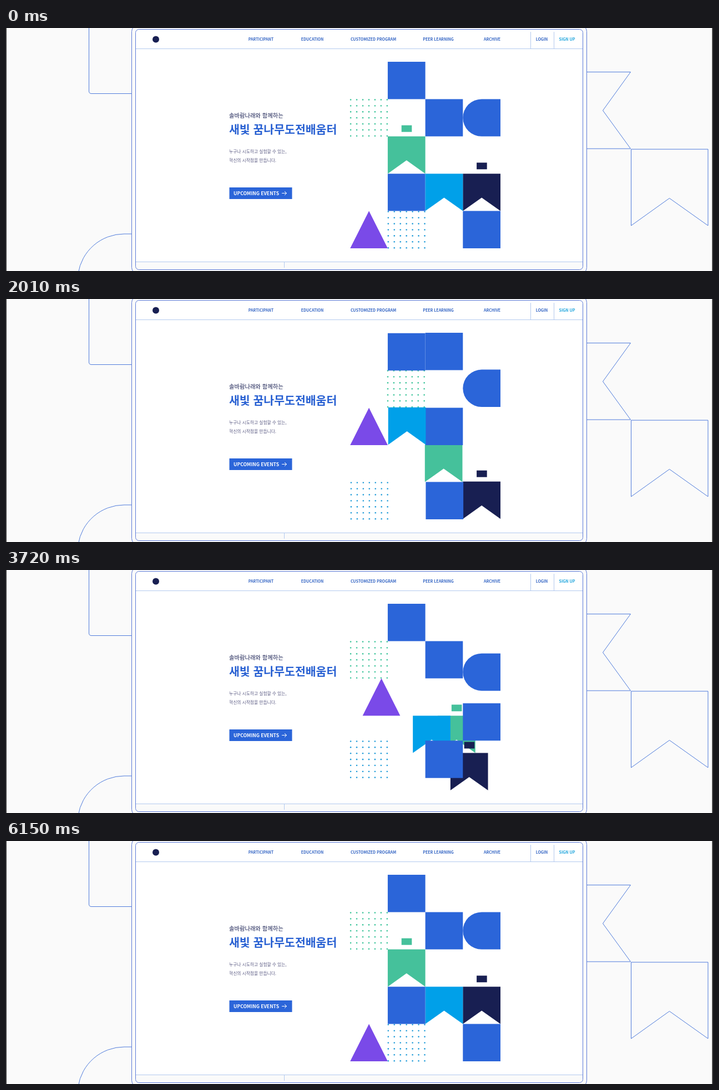
Recreate the animation shown at these times as an HTML page. Size 1274 by 439 pixels, loop 6180 ms.

```html
<!DOCTYPE html>
<html lang="ko">
<head>
<meta charset="utf-8">
<title>Moving blocks</title>
<style>
html, body { margin: 0; width: 100%; height: 100%; overflow: hidden; background: #fafafa; }
svg { display: block; font-family: "Noto Sans CJK KR", "Noto Sans CJK JP", "Noto Sans", sans-serif; }
.line { fill: none; stroke: #4f7bdb; }
.pale { fill: none; stroke: #b3c9ee; }
.nav { font-size: 7px; font-weight: 700; fill: #3465c4; text-anchor: middle; }
.body { font-size: 7.75px; fill: #5c5c84; }
</style>
</head>
<body>
<svg width="1274" height="439" viewBox="0 0 1274 439">
  <rect width="1274" height="439" fill="#fafafa"/>
  <path fill="#333" d="M0 0h1v439h-1z"/>
  <path fill="#1c1c1c" d="M1272.5 0h1.5v439h-1.5z"/>

  <!-- background outlines -->
  <g class="line">
    <path d="M149.5 0V114q0 4.5 4.5 4.5H226"/>
    <path d="M130 444A84 84 0 0 1 213 372H226"/>
    <path d="M1046 79.5H1125.5L1075.5 149 1125.5 218H1046"/>
    <path d="M1126.5 219H1265V357L1195.5 307.5 1126.5 357Z"/>
  </g>

  <!-- window -->
  <rect x="226.5" y="-5.5" width="820" height="450" rx="12" fill="#fafafa" stroke="#5d7bd8"/>
  <rect x="233.5" y="2.5" width="806" height="434" rx="6" fill="#fff"/>
  <path d="M234 422H1039V430q0 6-6 6H240q-6 0-6-6Z" fill="#fafafa"/>
  <path class="pale" d="M234 37.5H1039M945.5 7V37M987.5 7V37M234 422.5H1039M501.5 422V433"/>
  <rect x="233.5" y="2.5" width="806" height="434" rx="6" fill="none" stroke="#5d7bd8"/>
  <circle cx="270" cy="20.5" r="6" fill="#181f52"/>
  <g id="nav"></g>

  <!-- copy -->
  <text x="402" y="162" font-size="10.3" font-weight="500" fill="#181f52">솔바람나래와 함께하는</text>
  <text x="402" y="191" font-size="20.5" font-weight="700" fill="#2860d2">새빛 꿈나무도전배움터</text>
  <text class="body" x="402" y="226">누구나 시도하고 실험할 수 있는,</text>
  <text class="body" x="402" y="241.5">혁신의 시작점을 만듭니다.</text>
  <rect x="402.5" y="288" width="113" height="21" fill="#2b65d9"/>
  <text x="410" y="301.8" font-size="8.6" font-weight="700" fill="#fff">UPCOMING EVENTS</text>
  <path d="M497 298.5h8.5M502 295l3.5 3.5-3.5 3.5" fill="none" stroke="#fff"/>

  <g id="blocks"></g>
</svg>
<script>
const LOOP = 6180, FIRST = 374, PERIOD = 900, MOVE = 740;
const W = 67.7, H = 67.4, LEFT = 620.2, TOP = 61;
const blue = '#2b65d9', cyan = '#00a0e9', green = '#45c19b', navy = '#181f52';

const nav = [['PARTICIPANT', 459.5], ['EDUCATION', 552], ['CUSTOMIZED PROGRAM', 662],
  ['PEER LEARNING', 779], ['ARCHIVE', 876], ['LOGIN', 965.5], ['SIGN UP', 1011]];
document.getElementById('nav').innerHTML = nav.map(([label, x]) =>
  `<text class="nav" x="${x}" y="23.1"${label === 'SIGN UP' ? ' style="fill:#1ba3dc"' : ''}>${label}</text>`).join('');

const shape = (d, fill) => `<path d="${d}" fill="${fill}"/>`;
const square = shape(`M0 0H${W}V${H}H0Z`, blue);
const flag = (fill, head = '') => shape(`M0 0H${W}V${H}L${W / 2} 43.3 0 ${H}Z${head}`, fill);
const head = 'M24.8-20h18.6v12h-18.6z';
const dots = fill => Array.from({ length: 49 }, (_, i) =>
  `<circle cx="${0.9 + i % 7 * 10.95}" cy="${1.2 + Math.floor(i / 7) * 10.9}" r="1.3" fill="${fill}"/>`).join('');

// Each block, back to front, with its column and row at every stop.
const blocks = [
  [dots('#3cc49a'), '01 01 11 01 01 01 01'],
  [dots('#1f9bd8'), '14 14 04 03 04 04 14'],
  [shape(`M${W / 2} 0H${W}V${H}H${W / 2}A${W / 2} ${H / 2} 0 0 1 ${W / 2} 0Z`, blue), '31 30 31 32 31 31 31'],
  [shape(`M${W / 2} 0L${W} ${H}H0Z`, '#7a4ae8'), '04 03 02 12 02 03 04'],
  [flag(green, head), '12 13 23 33 23 13 12'],
  [flag(navy, head), '33 33 34 24 34 33 33'],
  [square, '10 20 20 21 21 21 21'],
  [square, '21 11 10 10 10 10 10'],
  [square, '13 23 22 32 33 34 34'],
  [flag(cyan), '23 22 12 13 23 23 23'],
  [square, '34 34 24 23 24 14 13']
].map(([art, stops]) => ({ art, stops: stops.split(' ') }));

const layer = document.getElementById('blocks');
layer.innerHTML = blocks.map(b => `<g>${b.art}</g>`).join('');

function draw(now) {
  const t = Math.max(0, now % LOOP - FIRST);
  const step = Math.min(5, Math.floor(t / PERIOD));
  const p = Math.min(1, (t - step * PERIOD) / MOVE) ** 3;
  blocks.forEach(({ stops }, i) => {
    const [a, b] = [stops[step], stops[step + 1]];
    const at = k => +a[k] + (b[k] - a[k]) * p;
    layer.children[i].setAttribute('transform', `translate(${LEFT + at(0) * W} ${TOP + at(1) * H})`);
  });
}

const start = performance.now();
function tick() {
  draw(performance.now() - start);
  requestAnimationFrame(tick);
}
tick();
</script>
</body>
</html>
```
